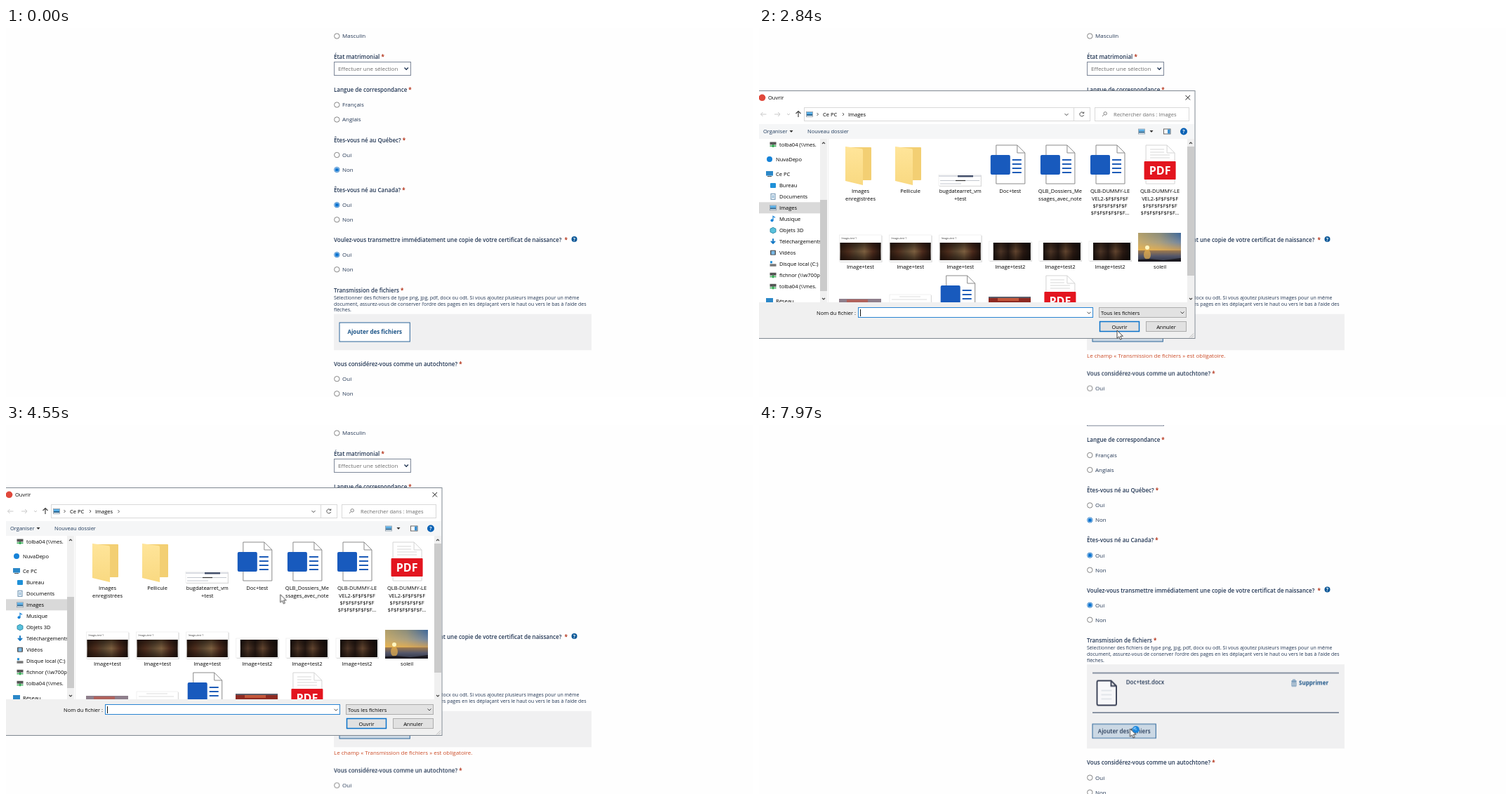
These frames come from a looping animation (1064 px wide and 526 px high, 8 s). An HTML page:

```html
<!DOCTYPE html>
<html lang="fr">
<head>
<meta charset="utf-8">
<title>Transmission de fichiers</title>
<style>
html, body { margin: 0; width: 100%; height: 100%; overflow: hidden; background: #fefefe; }
svg { display: block; position: absolute; left: 0; top: 0; }
text { font: 400 8px "Open Sans", "Noto Sans", sans-serif; fill: #223654; white-space: pre; }
.h { font-weight: 600; }
.b { font-weight: 700; fill: #1d5588; }
.s { font-size: 7px; }
.star { font-weight: 700; fill: #b5351c; }
.err { fill: #cb4a25; }
.d { font-size: 7.5px; fill: #000; }
.blue { fill: #1e395b; }
.grey { fill: #6c6c6c; }
.mid { text-anchor: middle; }
.end { text-anchor: end; }
.pdf { font-size: 16px; font-weight: 700; fill: #fff; text-anchor: middle; }
.q { font-size: 7px; font-weight: 700; fill: #fff; text-anchor: middle; }
.tiny { font-size: 3.6px; fill: #333; }

/* one loop = 8 s, so 1% = 80 ms */
.a { animation: 8s step-end infinite; }
#page { animation-name: scroll; }
#tail { animation-name: tail; }
#panel { animation-name: panel; }
#error { animation-name: error; }
#big { animation-name: big; }
#bigFill { animation: hoverBig 8s linear infinite; }
#row { animation-name: row; }
#check { animation-name: check; }
#del { animation-name: del; }
#smallFill { animation: hoverSmall 8s linear infinite; }
#dialog { animation-name: dialog; }
#content { animation-name: content; }
#thumbs { animation-name: thumbs; }
#chev { animation-name: chev; }
#hovA { animation-name: hovA; }
#hovB { animation-name: hovB; }
#pointer { animation-name: pointer; }
#move { animation: move 8s linear infinite; }
#spot { animation-name: spot; }
#busy { animation-name: busy; }

@keyframes scroll { 0% { transform: none } 82.5% { transform: translateY(-66.5px) } }
@keyframes tail { 0% { transform: none } 28.375% { transform: translateY(13.5px) } 68.75% { transform: translateY(69px) } }
@keyframes panel { 0% { height: 51.5px } 68.75% { height: 120px } }
@keyframes error { 0%, 68.75% { opacity: 0 } 28.375% { opacity: 1 } }
@keyframes big { 0% { opacity: 1 } 68.75% { opacity: 0 } }
@keyframes hoverBig { 0%, 19.5% { fill: #fff } 21.5%, 100% { fill: #cbd8e4 } }
@keyframes row { 0% { opacity: 0 } 68.75% { opacity: 1 } }
@keyframes check { 0%, 85.5% { opacity: 0 } 74.75% { opacity: 1 } }
@keyframes del { 0% { opacity: 0 } 85.5% { opacity: 1 } }
@keyframes hoverSmall { 0%, 92.5% { fill: #fff } 94.75%, 100% { fill: #cbd8e4 } }
@keyframes dialog { 0%, 61.875% { opacity: 0 } 32.125% { opacity: 1 } }
@keyframes content { 0% { opacity: 0 } 34% { opacity: 1 } }
@keyframes thumbs { 0% { opacity: 0 } 35.5% { opacity: 1 } }
@keyframes chev { 0% { opacity: 0 } 38.125% { opacity: 1 } }
@keyframes hovA { 0%, 53.75% { opacity: 0 } 48% { opacity: 1 } }
@keyframes hovB { 0% { opacity: 0 } 58% { opacity: 1 } }
@keyframes pointer { 0% { opacity: 0 } 10.125% { opacity: 1 } }
@keyframes spot { 0%, 27.625%, 63.5%, 98.875% { opacity: 0 } 24.625%, 60.25%, 97.25% { opacity: 1 } }
@keyframes busy { 0% { opacity: 0 } 99.6% { opacity: 1 } }
@keyframes move {
  0%, 10.125% { transform: translate(1007px, 497px) }
  13% { transform: translate(830px, 402px) }
  15.5% { transform: translate(665px, 369px) }
  17.5% { transform: translate(565px, 396px); animation-timing-function: ease-out }
  19.625%, 42% { transform: translate(510px, 431px); animation-timing-function: ease-in-out }
  48.75%, 52.625% { transform: translate(481px, 297px); animation-timing-function: ease-in }
  56.875% { transform: translate(391px, 242px); animation-timing-function: ease-out }
  59.5%, 64.5% { transform: translate(353.5px, 193px); animation-timing-function: ease-in-out }
  74%, 87.875% { transform: translate(577px, 337px); animation-timing-function: ease-in-out }
  94.5%, 100% { transform: translate(528.5px, 433px) }
}
</style>
</head>
<body>
<script>
const text = (x, y, s, cls = '') => `<text x="${x}" y="${y + 2.8}" class="${cls}">${s}</text>`;
const rect = (x, y, w, h, fill, more = '') => `<rect x="${x}" y="${y}" width="${w}" height="${h}" fill="${fill}" ${more}/>`;
const disc = (x, y, r, fill, more = '') => `<circle cx="${x}" cy="${y}" r="${r}" fill="${fill}" ${more}/>`;
const path = (d, stroke = '#444', w = 1, fill = 'none') => `<path d="${d}" fill="${fill}" stroke="${stroke}" stroke-width="${w}"/>`;
const anim = (id, body) => `<g id="${id}" class="a">${body}</g>`;
const clip = (id, body) => `<g clip-path="url(#${id})">${body}</g>`;

// ---- form ----
const head = (y, s, gap = ' ') => text(467, y, `${s}${gap}<tspan class="star">*</tspan>`, 'h');
const radio = (y, s, on) => (on
  ? disc(471.3, y, 3.7, '#fff', 'stroke="#1a72c4" stroke-width=".9"') + disc(471.3, y, 2.6, '#0b74d1')
  : disc(471.3, y, 3.7, '#fff', 'stroke="#767676" stroke-width=".9"')) + text(479, y, s);
const yesNo = (y, yes, no) => radio(y, 'Oui', yes) + radio(y + 21, 'Non', no);

const form =
  radio(11.5, 'Masculin') +
  head(41, 'État matrimonial') +
  rect(467.5, 48.5, 109, 19, '#fff', 'stroke="#7e8899"') +
  text(473, 58, 'Effectuer une sélection', 'grey') +
  path('M567.5 56.5l2.7 2.8 2.7-2.8', '#223654', 1.3) +
  head(88, 'Langue de correspondance') + radio(109.5, 'Français') + radio(130.5, 'Anglais') +
  head(160, 'Êtes-vous né au Québec?') + yesNo(181, false, true) +
  head(231, 'Êtes-vous né au Canada?') + yesNo(252.2, true, false) +
  head(302.3, 'Voulez-vous transmettre immédiatement une copie de votre certificat de naissance?', '\u00a0 ') +
  disc(809.5, 301, 4, '#095797') + text(809.5, 300.8, '?', 'q') +
  yesNo(323.2, true, false) +
  head(373.7, 'Transmission de fichiers') +
  text(467, 384, 'Sélectionner des fichiers de type png, jpg, pdf, docx ou odt. Si vous ajoutez plusieurs images pour un même', 's') +
  text(467, 392.8, "document, assurez-vous de conserver l'ordre des pages en les déplaçant vers le haut ou vers le bas à l'aide des", 's') +
  text(467, 401.5, 'flèches.', 's') +
  rect(467, 407.7, 367, 51.5, '#f0f0f1', 'id="panel" class="a"') +
  anim('error', text(467, 467.5, 'Le champ « Transmission de fichiers » est obligatoire.', 'err')) +
  anim('big', rect(475, 420, 100.3, 27, '#fff', 'id="bigFill" stroke="#2a6499"') +
    text(525.2, 433.5, 'Ajouter des fichiers', 'b mid')) +
  anim('row',
    path('M475 420h351M475 476.5h351', '#223654') +
    path('M483.5 431h18l7.5 7.5v25.5q0 2-2 2h-23.5q-2 0-2-2v-31q0-2 2-2zM501.5 431v7.5h7.5', '#3a4156', 1.9, '#f8f8fa') +
    path('M487.5 445h15M487.5 451h15M487.5 457h15', '#dcdfe6', 1.3) +
    text(522.7, 433, 'Doc+test.docx', 'h') +
    anim('check', disc(785.8, 434.8, 5, '#095797') + path('M783.2 435l1.9 1.9 3.4-3.8', '#fff', 1.3)) +
    anim('del', path('M758 431.5h8M760.5 431v-1.3h3v1.3M759 432.8h6v6h-6zM761 433v5.5M763 433v5.5', '#5583ab', .9) +
      text(769, 434.3, 'Supprimer', 'b')) +
    rect(475, 492.8, 90.3, 20.2, '#fff', 'id="smallFill" stroke="#2a6499"') +
    text(520.2, 502.8, 'Ajouter des fichiers', 'h mid')) +
  anim('tail', head(479, 'Vous considérez-vous comme un autochtone?') + yesNo(500.2));

// ---- file dialog ----
const picIcon = (x, y) => rect(x - 4.5, y - 3.5, 9, 7, '#fff', 'stroke="#8b98a5" stroke-width=".8"') +
  rect(x - 4, y - 3, 8, 3, '#58aee6') + rect(x - 4, y, 8, 2, '#2c6690');
const down = (x, y) => path(`M${x - 2.5} ${y - 1.2}l2.5 2.5 2.5-2.5`, '#444');
const next = (x, y) => path(`M${x - 1} ${y - 2}l2 2-2 2`, '#555');
const caret = (x, y) => path(`M${x - 2.5} ${y - 1.3}h5l-2.5 3z`, 'none', 0, '#333');
const sq = (x, y, c) => rect(x - 4, y - 3.5, 8, 7, c, 'rx="1"');
const drive = (x, y) => rect(x - 4.5, y - 3.5, 9, 4, '#555') + rect(x - 4.5, y + 1.5, 9, 1.5, '#2fa84f') + rect(x - 1, y, 2, 4, '#2fa84f');
const screen = (x, y) => rect(x - 5, y - 4, 10, 6.5, '#2b88c8') + rect(x - 3, y + 3, 6, 1, '#555');

const chrome =
  rect(-1, 89.5, 622, 353, '#fff', 'stroke="#7f8790"') +
  disc(4.5, 99.3, 4.8, '#e0483b') + text(13, 99.5, 'Ouvrir', 'd') +
  path('M607.5 96l6.5 6.5M614 96l-6.5 6.5', '#222') +
  path('M10.5 123h-8M5.5 120l-3 3 3 3M22 123h8M27 120l3 3-3 3M40 122l2 2 2-2', '#c9c9c9') +
  path('M56 127v-8M52.5 122l3.5-3.5 3.5 3.5', '#444', 1.2) +
  rect(64.5, 113.5, 407, 19, '#fff', 'stroke="#d9d9d9"') + path('M448.5 113v20', '#d9d9d9') +
  down(438, 123.3) + path('M462.3 121.2a3 3 0 1 0 .4 2.6M462.8 119.5v2h-2', '#444', .9) +
  rect(478.5, 113.5, 134, 19, '#fff', 'stroke="#d9d9d9"') +
  path('M489 126l2.3-2.5M491 121.8a2.2 2.2 0 1 1 4.4 0a2.2 2.2 0 1 1-4.4 0', '#777', .9) +
  rect(0, 137, 620, 21, '#f5f6f7') +
  text(6, 147.5, 'Organiser', 'd blue') + caret(46, 147.3) + text(69, 147.5, 'Nouveau dossier', 'd blue') +
  picIcon(545, 147.5) + caret(559, 147.3) +
  rect(576.5, 144, 9.5, 7, '#fff', 'stroke="#555" stroke-width=".9"') + rect(582, 144.5, 3.6, 6, '#3a8fd0') +
  disc(605, 147.5, 5, '#0b62b5') + text(605, 147.3, '?', 'q') +
  rect(0, 391, 620, 51, '#f0f0f0') +
  text(138, 406, 'Nom du fichier :', 'd end') +
  rect(141.5, 398.5, 334, 14, '#fff', 'stroke="#2a84d2"') + path('M144.5 401v10', '#111') + down(470, 406) +
  rect(484.5, 398.5, 124, 14, '#e2e2e2', 'stroke="#adadad"') + text(487, 406, 'Tous les fichiers', 'd') + down(603, 405.7) +
  rect(485.5, 418.5, 56, 14, '#e1e1e1', 'stroke="#0a72c9" stroke-width="1.5"') + text(513.5, 425.7, 'Ouvrir', 'd mid') +
  rect(551.5, 418.5, 57, 14, '#e1e1e1', 'stroke="#adadad"') + text(580, 425.7, 'Annuler', 'd mid') +
  path('M613 441.5l6-6M616 441.5l3-3', '#bbb', 1);

const side = [
  [166, 'tolba04 (\\\\mes.', drive],
  [187, 'NuvaDepo', (x, y) => disc(x, y, 4, '#1683d8'), 24],
  [208, 'Ce PC', screen, 24],
  [224.5, 'Bureau', (x, y) => sq(x, y, '#1e90d8')],
  [240.3, 'Documents', (x, y) => rect(x - 3, y - 4, 6, 8, '#eef4f9', 'stroke="#6b8fae"') + path(`M${x - 1.5} ${y - 1}h3m-3 2h3`, '#3a80b8', .8)],
  [256.3, 'Images', picIcon],
  [272.3, 'Musique', (x, y) => disc(x - 1.5, y + 2, 2, '#1683d8') + path(`M${x} ${y + 2}v-6l3 2`, '#1683d8', 1.2)],
  [288.3, 'Objets 3D', (x, y) => path(`M${x} ${y - 4}l4 2v4.5l-4 2-4-2v-4.5z`, '#1b7f9c', .8, '#59c1dc')],
  [304.3, 'Téléchargements', (x, y) => path(`M${x} ${y - 4}v6m-3-2.5l3 3 3-3`, '#1277c4', 1.9)],
  [320.3, 'Vidéos', (x, y) => sq(x, y, '#555') + rect(x - 2.5, y - 2.5, 5, 5, '#79b9e6')],
  [336.3, 'Disque local (C:)', (x, y) => rect(x - 4.5, y, 9, 3.5, '#777') + rect(x - 4, y - 4, 3, 3, '#1e90d8')],
  [352.3, 'fichnor (\\\\w700p', drive],
  [368.3, 'tolba04 (\\\\mes.', drive],
  [389, 'Réseau', screen, 24]
];
const bar = (x, top, len) => rect(x, 158, 10, 233, '#f0f0f0') + rect(x, top, 10, len, '#cbcbcb') +
  path(`M${x + 3} 165l2-2 2 2M${x + 3} 385l2 2 2-2`, '#444', 1.1);
const nav = rect(0, 248.3, 87, 16, '#d9d9d9') +
  side.map(([y, s, icon, x = 29]) => icon(x - 9, y) + text(x, y, s, 'd')).join('');

const col = i => 144.5 + 71.1 * i;
const label = (i, y, ...rows) => rows.map((s, k) => text(col(i), y + k * 10.2, s, 'd mid')).join('');
const folder = x => rect(x - 18, 170, 36, 47, '#f3cf73', 'rx="1"') +
  path(`M${x - 19} 169l23 3q2 0 2 3v49l-25-6z`, 'none', 0, 'url(#flap)');
const sheet = (x, y, c) => path(`M${x - 20} ${y}h30l11 11v44h-41zM${x + 10} ${y}v11h11`, c, 1, '#fff');
const doc = (x, y) => sheet(x, y, '#8a8a8a') +
  path([21, 27, 33, 39].map(k => `M${x + 3} ${y + k}h13`).join(''), '#1d5cb8', 2) +
  rect(x - 28, y + 14, 28, 28, '#185abd', 'rx="2"');
const pdf = (x, y) => sheet(x, y, '#d4d4d4') +
  path([6, 10, 14, 18].map(k => `M${x - 14} ${y + k}h${k < 12 ? 20 : 28}`).join(''), '#d8d8d8', 1.2) +
  rect(x - 22.5, y + 23, 45, 26, '#e3151f', 'rx="1"') + text(x, y + 39.2, 'PDF', 'pdf');
const frame = (x, y, w, h) => rect(x + 1, y + 1, w, h, '#d5d5d5') + rect(x, y, w, h, '#fff', 'stroke="#e6e6e6" stroke-width=".6"');
const dark = (x, y, w, h, tone) => rect(x, y, w, h, `url(#${tone})`) + rect(x, y, w, h, 'url(#shade)');
const shotA = x => frame(x - 30, 295, 60, 38) + text(x - 27, 298, 'Image+test 1', 'tiny') + dark(x - 29, 306, 58, 25, 'brown');
const shotB = x => frame(x - 30, 304, 60, 28) + dark(x - 24, 306, 53, 25, 'black');

const fill = 'QLB-DUMMY-LE', money = ['VEL2-$F$F$F$F', '$F$F$F$F$F$F', '$F$F$F$F$F$F...'];
const files =
  folder(142) + folder(213) +
  label(0, 232.5, 'Images', 'enregistrées') + label(1, 232.5, 'Pellicule') +
  label(2, 232.5, 'bugdatearret_vm', '+test') + label(3, 232.5, 'Doc+test') +
  label(4, 232.5, 'QLB_Dossiers_Me', 'ssages_avec_note') +
  label(5, 232.5, fill, ...money) + label(6, 232.5, fill, ...money) +
  [0, 1, 2].map(i => label(i, 340, 'Image+test')).join('') +
  [3, 4, 5].map(i => label(i, 340, 'Image+test2')).join('') + label(6, 340, 'soleil') +
  [3, 4, 5].map(i => doc(col(i), 167)).join('') + pdf(col(6), 167) +
  doc(col(2), 353) + pdf(col(4), 353);

const sunset = rect(540, 292, 61, 41, 'url(#sky)') + rect(540, 292, 61, 25, 'url(#glow)') +
  rect(540, 317, 61, 16, 'url(#sea)') + disc(553, 313, 3, '#fff6c0') +
  '<ellipse cx="553" cy="323" rx="5" ry="7" fill="#e9b04c" opacity=".7"/>' +
  path('M540 333v-3l16-1 20 2 25-3v5z', 'none', 0, '#1d1b22');

const thumbs =
  frame(256, 209, 60, 16) + rect(256, 210, 60, 2, '#d9dce2') + rect(283, 210, 22, 2.5, '#44506b') +
  path('M258 217.5h56M258 222h30', '#c3c7ce', 1) + path('M280 217.5h14', '#333', 1.2) +
  [0, 1, 2].map(i => shotA(col(i))).join('') + [3, 4, 5].map(i => shotB(col(i))).join('') +
  sunset +
  rect(114, 386, 60, 8, '#8f7f8c') + rect(125, 387, 30, 6, '#b0625c') +
  frame(186, 380, 59, 20) + path('M189 387h50M200 383h30', '#ddd', 1.2) +
  rect(327, 383, 60, 12, '#8e2a22') + rect(340, 385, 30, 4, '#c4573a') + rect(327, 383, 60, 2, '#5a5d6a');

const content =
  picIcon(72, 123) + next(83.5, 123) + text(91, 123, 'Ce PC', 'd') + next(120, 123) +
  text(127, 123, 'Images', 'd') + anim('chev', next(160.5, 123.3)) +
  text(505, 123, 'Rechercher dans : Images', 'd grey') +
  clip('side', nav) + bar(87, 245, 130) + path('M98.5 158v233', '#eee') +
  clip('list',
    anim('hovA', rect(465, 270, 70, 77, '#e5f3ff')) + anim('hovB', rect(323, 162, 70, 78, '#e5f3ff')) +
    files + anim('thumbs', thumbs)) +
  bar(610, 169, 184);

// ---- pointer ----
const arrow = path('M0 0v11.3l2.7-2.4 1.9 4.2 2-.9-1.9-4h3.7z', '#333', .9, '#fff');
const pointer = `<g id="move">${anim('spot', disc(0, 0, 13.3, '#fbf46c'))}${arrow}` +
  anim('busy', disc(8.3, 1, 5, '#1b86dc') + path('M5.5 1a2.8 2.8 0 0 1 2.8-2.8', '#9fd4fa', 1.4) + disc(8.3, 1, 1.4, '#5fb2f0')) + '</g>';

const grad = (id, dir, ...stops) => `<linearGradient id="${id}" x2="${dir === 'x' ? 1 : 0}" y2="${dir === 'y' ? 1 : 0}">` +
  stops.map((c, i) => `<stop offset="${i / (stops.length - 1)}" stop-color="${c}"/>`).join('') + '</linearGradient>';
const area = (id, x, w) => `<clipPath id="${id}">${rect(x, 158, w, 233, '#000')}</clipPath>`;
const defs =
  grad('flap', 'y', '#ffe59a', '#f9d981') +
  grad('brown', 'x', '#2c1a10', '#4c2c1c', '#5a4630', '#7d6040', '#4c2a1c', '#1f120d') +
  grad('black', 'x', '#17100d', '#4d3526', '#241712', '#62452f', '#2b1a13', '#120d0b') +
  grad('shade', 'y', '#0d080699', '#0d080600', '#0d080699') +
  grad('sky', 'y', '#3c6699', '#7287a3', '#d9a04c', '#e08a2c') +
  grad('glow', 'x', '#ffc44a99', '#ffc44a66', '#ffc44a00') +
  grad('sea', 'y', '#a07a4c', '#54566a', '#2c3244') +
  area('side', 0, 87) + area('list', 99, 511);

document.body.innerHTML = `<svg width="1064" height="526" viewBox="0 0 1064 526">
  <defs>${defs}</defs>
  ${anim('page', form)}${anim('dialog', chrome + anim('content', content))}${anim('pointer', pointer)}
</svg>`;
</script>
</body>
</html>
```
